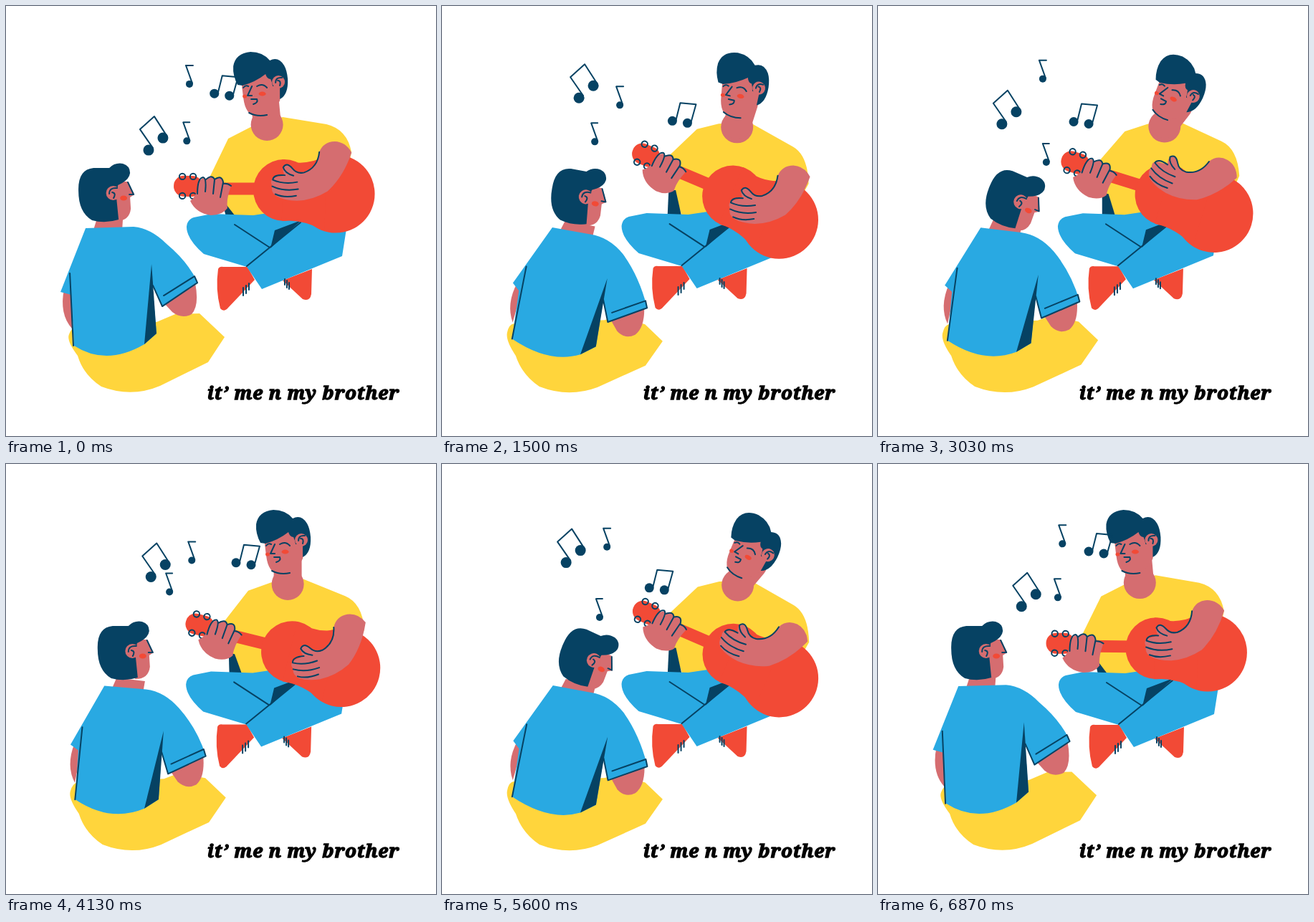
An HTML page that plays this animation: 600 px wide and 600 px high, repeating every 6910 ms.

```html
<!DOCTYPE html>
<html lang="en">
<head>
<meta charset="utf-8">
<title>Two brothers and a guitar</title>
<style>
html, body { margin: 0; width: 100%; height: 100%; overflow: hidden; background: #fff; }
svg { display: block; width: 100vw; height: 100vh; }
.skin { fill: #d56d70; }
.navy { fill: #064263; }
.blue { fill: #29a9e2; }
.gold { fill: #ffd53c; }
.red { fill: #f24a36; }
.ink { fill: none; stroke: #064263; stroke-width: 2; stroke-linecap: round; stroke-linejoin: round; }
.neck { stroke: #d56d70; stroke-width: 39; stroke-linecap: round; }
text {
  font: italic 900 26px "Noto Serif", "Liberation Serif", serif;
  letter-spacing: .8px; text-anchor: middle;
  stroke: #000; stroke-width: 1.3px;
}
</style>
</head>
<body>
<svg viewBox="0 0 600 600">
  <!-- guitarist: shirt, legs, shoes -->
  <path class="gold" d="M386,155 L447,165 Q476,172 482,204 L470,262 L362,292 L322,297 L300,275 L285,237 L310,185 L345,167Z"
    data-to="M432,163 L492,198 Q512,210 513,250 L490,290 L372,290 L336,294 L322,250 L318,208 L358,171 L388,164Z"/>
  <path class="navy" d="M302,274 L308,278 L323,297 L307,294Z" data-to="M317,256 L327,256 L335,294 L315,293Z"/>
  <g id="legs">
    <path class="red" d="M296,367 Q298,363 303,364 H337 L347,382 L310,421 Q304,428 299,422 Q292,395 296,367Z
      M427,367 L426,402 Q424,413 414,409 L386,383Z"/>
    <path class="blue" d="M252,308 Q253,298 262,295 L287,290 L345,292 L372,288 L460,295 L475,311 L469,349 L357,395 L336,364 L276,346 Q252,325 252,308Z"/>
    <path class="navy" d="M375,313 L412,299 L369,338Z"/>
    <path class="ink" d="M319,305 L368,337 M411,302 L336,363"/>
    <path class="ink" stroke-width="1.5" d="M331,393v11 M335,390v11 M339,387v9 M389,381v8 M392,383v10 M395,386v9"/>
  </g>

  <g id="guitar">
    <rect class="red" x="255" y="246.5" width="100" height="17"/>
    <rect class="red" x="234" y="237" width="40" height="29" rx="14"/>
    <circle class="red" cx="388" cy="257" r="43"/>
    <circle class="red" cx="460" cy="262" r="54.5"/>
    <path class="red" d="M385,214 Q415,225 445,210 V314 Q415,297 385,300Z"/>
    <g class="ink">
      <circle cx="246" cy="238" r="4.2"/><circle cx="261" cy="238" r="4.2"/>
      <circle cx="246" cy="265" r="4.2"/><circle cx="261" cy="265" r="4.2"/>
    </g>
    <path class="skin" d="M257,272 Q266,266 268,250 Q272,237 279,241 Q287,235 292,241 Q301,236 304,247 L314,251 Q307,270 309,282 Q302,292 286,292 Q265,289 257,272Z"/>
    <path class="ink" d="M267,262 Q267,240 275,239 Q280,240 278,259 M278,243 Q287,234 291,242 L289,262 M291,242 Q301,235 303,246 L299,267 M303,248 Q309,247 314,251"/>
  </g>

  <g id="arm">
    <path class="skin" d="M437,203 Q443,189 459,189 Q474,190 482,205 Q470,238 447,258 Q426,270 404,270 Q386,269 376,263 Q367,257 370,248 Q366,241 373,237 L388,234 Q383,225 388,220 Q394,217 402,229 Q409,234 417,230 Q434,223 437,203Z"/>
    <path class="ink" d="M437,203 Q434,225 415,231 Q405,233 399,225 Q391,215 386,223 Q388,231 400,235 M388,234 Q372,232 371,240 Q386,247 405,244 M370,249 Q386,257 406,254 M374,260 Q386,266 403,263"/>
  </g>

  <circle class="skin" id="collar" r="22.5"/>
  <line class="neck" id="neck"/>
  <g id="head">
    <path class="skin" d="M328,104 L331,128 Q334,153 350,154 Q372,153 382,132 L386,100 L345,88Z"/>
    <path class="navy" d="M330,111 L323,110 Q316,97 317,84 Q320,66 341,64 Q358,64 368,76 Q380,70 388,83 Q392,90 393,102 Q394,124 382,130 L382,112 L372,112 Q371,106 369,102 Q364,102 362,95 Q348,106 330,111Z"/>
    <circle class="skin" cx="380" cy="106" r="9"/>
    <ellipse class="red" cx="357.5" cy="122.5" rx="5" ry="3"/>
    <ellipse class="red" cx="333" cy="126" rx="3" ry="2.5"/>
    <path class="ink" d="M385,100 Q376,99 376,107 M379,104 Q384,104 382,111 M343,112 L337,125 H343 M342,130 L350,130 Q352,135 345,137 M331,114 Q334,110 338,112 M350,112 Q358,107 364,114 M339,149 Q350,155 364,152"/>
  </g>

  <!-- listener -->
  <path class="gold" d="M88,458 Q92,448 100,446 L210,441 L236,430 L270,429 L305,462 L282,497 L215,530 Q175,547 133,531 Q108,515 100,488 Q84,467 88,458Z"
    data-to="M91,456 Q93,444 100,443 L228,438 L245,432 L284,445 L308,468 L284,502 L217,532 Q177,547 136,531 Q112,515 103,488 Q89,467 91,456Z"/>
  <path class="skin" d="M81,395 Q74,430 92,450 L96,400Z" data-to="M106,386 Q90,415 99,441 L112,396Z"/>
  <path class="skin" d="M219,413 L264,387 Q270,418 259,430 Q245,437 232,427Z" data-to="M235,437 L283,420 Q284,450 270,460 Q256,467 245,455Z"/>
  <path class="skin" d="M127,296 L163,296 L162,312 L122,312Z" data-to="M174,300 L216,308 L212,324 L166,315Z"/>
  <path class="blue" d="M111,310 L178,308 Q202,310 224,332 Q254,357 267,385 L218,419 L204,388 L210,457 L193,472 Q140,503 95,474 L91,403 L76,399Z"
    data-to="M156,309 L208,319 Q235,323 254,347 Q276,378 287,422 L232,442 L226,411 L215,476 L193,487 Q150,499 98,464 L108,397 L100,386Z"/>
  <path class="navy" d="M203,360 L210,457 L193,472Z" data-to="M232,381 L215,476 L193,487Z"/>
  <path class="ink" d="M89,373 L94,474 M205,390 L218,419 L267,386 L263,377 L220,404" data-to="M119,363 L98,464 M226,411 L232,442 L287,423 L285,413 L238,429"/>
  <g id="listener">
    <path class="skin" d="M152,245 L170,245 L179,263 L173,267 L174,283 Q172,300 154,300 L140,290Z"/>
    <path class="navy" d="M101,258 Q100,228 122,226 L144,226 Q152,218 163,220 Q173,223 173,233 Q172,241 162,247 L156,250 L154,268 L157,298 Q138,304 120,299 Q101,288 101,258Z"/>
    <circle class="skin" cx="149.5" cy="261" r="10"/>
    <ellipse class="red" cx="164" cy="268" rx="5" ry="3.5"/>
    <path class="ink" d="M170,246 L178,263 H172 M155,254 Q144,253 144,262 M148,260 Q154,261 150,268"/>
  </g>

  <!-- notes, each with its first head at 0,0 -->
  <g id="noteA"><circle class="navy" r="5"/><path class="ink" d="M4,-1 L-5,-26 H5"/></g>
  <g id="noteB"><circle class="navy" r="6.5"/><circle class="navy" cx="21" cy="3" r="6.5"/><path class="ink" d="M5,-1 L11,-25 L33,-23 L26,2"/></g>
  <g id="noteC"><circle class="navy" r="7.5"/><circle class="navy" cx="20" cy="-17" r="7.5"/><path class="ink" d="M6,-3 L-12,-29 L8,-47 L26,-19"/></g>
  <g id="noteD"><circle class="navy" r="5"/><path class="ink" d="M4,-1 L-5,-26 H4"/></g>

  <text x="415" y="549">it’ me n my brother</text>
</svg>
<script>
const LOOP = 6910, SWAY = LOOP / 3;
const $ = id => document.getElementById(id);
const mix = (a, b, k) => a + (b - a) * k;
const NUM = /-?[\d.]+/g;

const morphs = [...document.querySelectorAll('[data-to]')].map(el => ({
  el, from: el.getAttribute('d'), to: el.dataset.to.match(NUM).map(Number)
}));

// [centre, swing, phase of the maximum] for x and y
const notes = {
  noteA: [[245, 16, .87], [117, 22, .69]],
  noteB: [[296, 28, .72], [148, 26, .48]],
  noteC: [[188, 16, .87], [164, 41, .07]],
  noteD: [[233, 22, .08], [198, 20, .33]]
};

const set = (id, attrs) => {
  for (const key in attrs) $(id).setAttribute(key, attrs[key]);
};
const place = (id, x, y, turn = 0, cx = 0, cy = 0) =>
  set(id, { transform: `translate(${x} ${y}) rotate(${turn} ${cx} ${cy})` });

// The picture moves in steps: one long hold, then nine short ones, every 700 ms
function stepTime(t) {
  const base = Math.floor(t / 700) * 700, m = t - base;
  return m < 100 ? base : base + 100 + Math.floor((m - 100) * .015 + .06) / .015;
}

function draw(t) {
  const p = stepTime(t) / SWAY;
  const wave = peak => Math.cos(2 * Math.PI * (p - peak));
  const lean = wave(.535);
  const body = .53 * (1 + lean) + .1 * (1 - lean * lean) - .015; // lingers near the far end
  const tilt = Math.max(0, .57 * (1 + wave(.395)) - .14);

  for (const { el, from, to } of morphs) {
    let i = 0;
    el.setAttribute('d', from.replace(NUM, n => mix(+n, to[i++], body).toFixed(2)));
  }

  place('legs', -1.5 * body, -body);
  place('guitar', 19 * body, 9 * body, 24 * body, 388, 257);
  place('arm', 33 * body, 35 * body, 8 + 20 * wave(.33), 460, 200);

  const hx = 55 * body + 20 * tilt, hy = 9.5 * tilt;
  const cx = mix(364, 414, body), cy = mix(165.5, 169, body);
  place('head', hx, hy, 30 * tilt, 358.5, 115);
  set('collar', { cx, cy });
  set('neck', { x1: 361 + hx, y1: 131 + hy, x2: cx, y2: cy - 3 });
  place('listener', 46 * body + 18 * tilt, 13 * tilt, 25 * tilt, 149, 261);

  for (const id in notes) {
    const [x, y] = notes[id].map(([mid, swing, peak]) => mid + swing * wave(peak));
    place(id, x, y);
  }
}

const start = performance.now();
function tick() {
  draw((performance.now() - start) % LOOP);
  requestAnimationFrame(tick);
}
tick();
</script>
</body>
</html>
```
